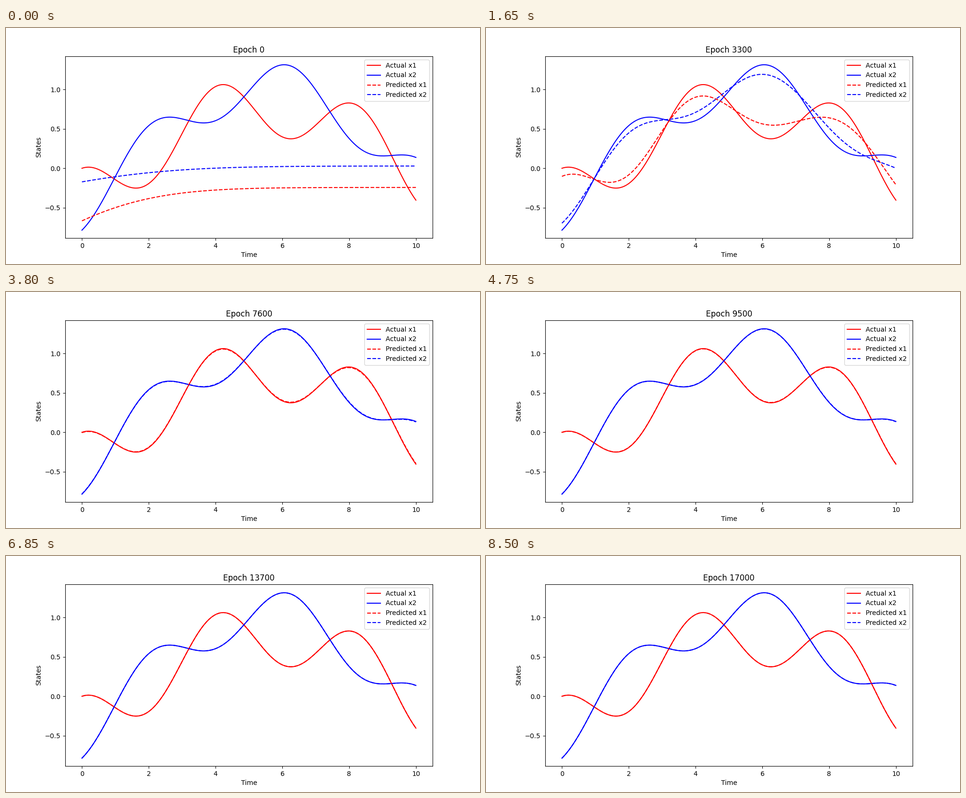
A matplotlib script for the animation above (8.55 s loop, 1000x500 px).

```python
import numpy as np
import matplotlib.pyplot as plt
from matplotlib.animation import FuncAnimation

FRAMES, STEP_MS = 171, 50
HUMP, WAVY = 18, 33  # frames where the prediction reaches these stages
SLOW, FAST = .374, 1.498  # angular frequencies of the two modes
COLORS = "red", "blue"

t = np.linspace(0, 10, 200)
s = t - 5
u = s / 5


def modes(a, b, c, d):
    return (a * np.cos(SLOW * s) + b * np.sin(SLOW * s)
            + c * np.cos(FAST * s) + d * np.sin(FAST * s))


def settle(level, drop, p, q):
    return level - drop * np.exp(-p * t - q * t**2)


def poly(*coef):
    return np.polynomial.polynomial.polyval(u, coef)


def ripple(odd, even):
    return odd * np.sin(1.55 * s) + even * np.cos(1.9 * s)


def mix(a, b, w):
    return a + (b - a) * w


actual = [modes(.766, .158, .067, -.378), modes(1.034, .211, -.053, .278)]
start = [settle(-.243, .424, .46, .045), settle(.029, .201, .36, .035)]
hump = [poly(.777, .277, -1.491, .023, .519, -.175),
        poly(1.03, .41, -1.724, -.426, .372, .239)]
error = [ripple(.15, -.047), ripple(-.113, .024)]


def predict(k, f):
    if f <= HUMP:
        w = (1 - np.exp(-f / 5)) / (1 - np.exp(-HUMP / 5))
        return mix(start[k], hump[k], w)
    if f <= WAVY:
        w = ((f - HUMP) / (WAVY - HUMP)) ** 2.5
        return mix(hump[k], actual[k] + error[k], w)
    d = f - WAVY
    return actual[k] + error[k] * mix(np.exp(-.25 * d), np.exp(-.035 * d), .2)


fig, ax = plt.subplots(figsize=(10, 5), dpi=100)
for k, color in enumerate(COLORS):
    ax.plot(t, actual[k], color=color, label=f"Actual x{k + 1}")
guesses = [
    ax.plot(t, start[k], "--", color=color, label=f"Predicted x{k + 1}")[0]
    for k, color in enumerate(COLORS)
]
ax.set(xlim=(-.5, 10.5), ylim=(-.885, 1.421), xlabel="Time", ylabel="States")
ax.legend(loc="upper right")
title = ax.set_title("Epoch 0")


def update(f):
    for k, line in enumerate(guesses):
        line.set_ydata(predict(k, f))
    title.set_text(f"Epoch {100 * f}")
    return [*guesses, title]


anim = FuncAnimation(fig, update, frames=FRAMES, interval=STEP_MS,
                     repeat=True, repeat_delay=0, blit=False)
plt.show()
```
